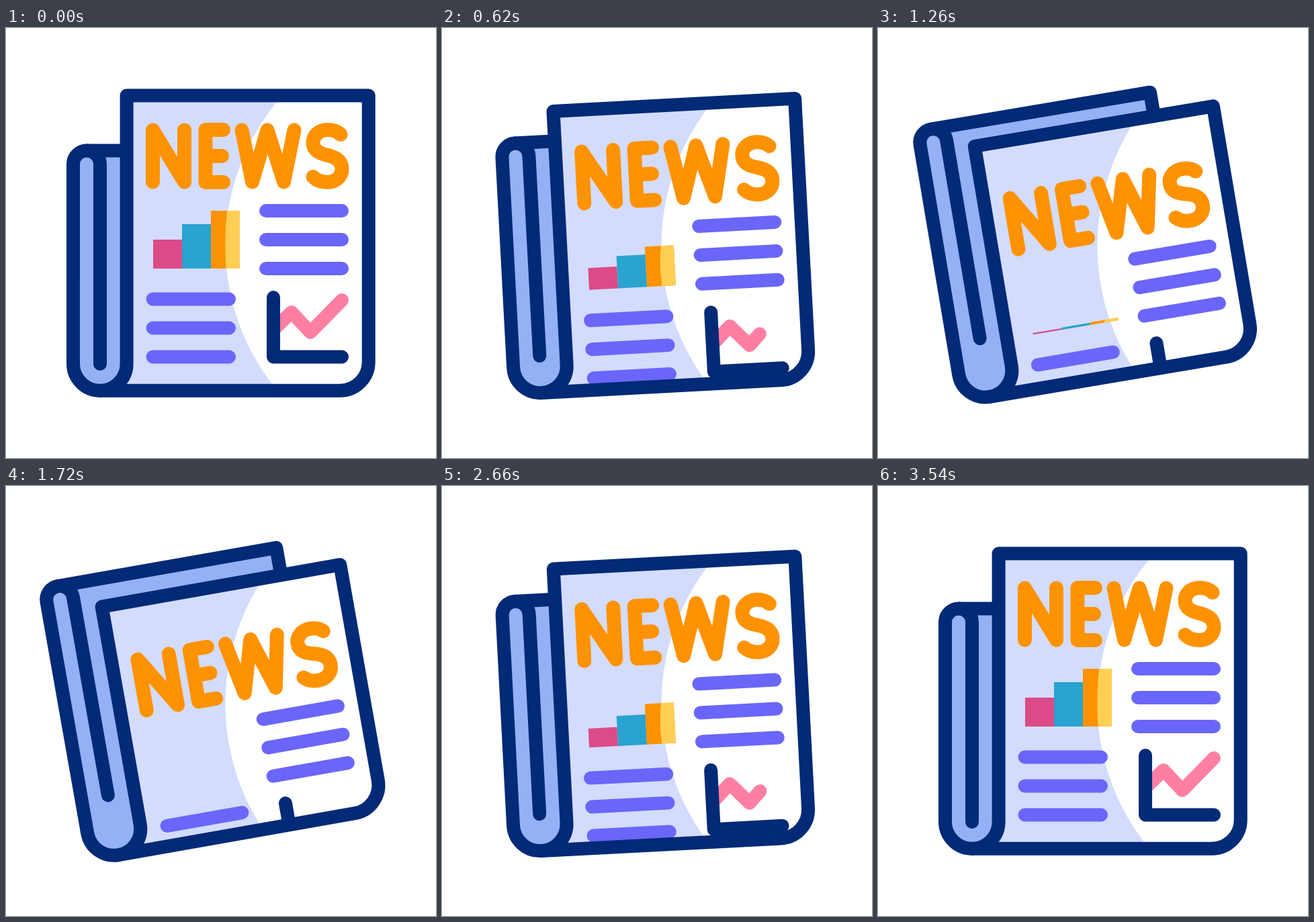
An HTML page with a canvas for the animation above (3600 ms loop, 640 by 640 pixels).

```html
<!DOCTYPE html>
<html lang="en">
<head>
<meta charset="utf-8">
<title>Newspaper</title>
<style>
  html, body { margin: 0; width: 100%; height: 100%; overflow: hidden; background: #fff; }
  canvas { display: block; width: 640px; height: 640px; }
</style>
</head>
<body>
<canvas id="stage" width="640" height="640"></canvas>
<script>
const ctx = document.getElementById('stage').getContext('2d');
const LOOP = 3600;
const PIVOT = [208, 387];
const NAVY = '#032a76', FOLD = '#94b1f5', PAPER = '#d3dcfc', PURPLE = '#6a66fa';
const ORANGE = '#ff9200', YELLOW = '#ffcf55', PINK = '#ff7fa3', MAGENTA = '#dc4b87', TEAL = '#29a3cf';

const LETTERS = [
  'M218.5 229V152L265.5 229V152',
  'M323.5 151.5H297V229.5H323.5M297 190.5H321.5',
  'M351 152L366.5 229L389 152L413.5 229L429 152',
  'M498 158.5C493 153.5 486 151.5 479 151.5C466 151.5 457 160 457 170C457 183 467 186.5 479 189.5' +
  'C491 192.5 500 198 500 210C500 222 490 229.5 478 229.5C469 229.5 462 226.5 457 221.5'
].map(d => new Path2D(d));
const AXES = new Path2D('M398 401V489.5H500');
const TREND = [[398, 449], [425, 423], [453, 453], [500, 405]];

// Ease with horizontal tangents: control points (x1, 0) and (x2, 1).
function ease(x, x1, x2) {
  if (x <= 0) return 0;
  if (x >= 1) return 1;
  let lo = 0, hi = 1, s = 0.5;
  for (let i = 0; i < 30; i++) {
    s = (lo + hi) / 2;
    const r = 1 - s;
    if (3 * r * r * s * x1 + 3 * r * s * s * x2 + s * s * s < x) lo = s; else hi = s;
  }
  return s * s * (3 - 2 * s);
}

function progress(t) {
  return t < 1840
    ? ease(t / 1760, 0.632, 0.096)
    : 1 - ease((t - 1920) / 1660, 0.6, 0.083);
}

function stroke(path, color, width = 20) {
  ctx.strokeStyle = color;
  ctx.lineWidth = width;
  ctx.stroke(path);
}

function fill(path, color) {
  ctx.fillStyle = color;
  ctx.fill(path);
}

function drawBack(p) {
  const top = 182.5 - 52.5 * p;
  const bend = top + 20;
  const outline = `M140 539.7A40 40 0 0 1 100 500V${bend}A20 20 0 0 1 120 ${top}H450.5V`;
  fill(new Path2D(outline + '500H179.6A39.7 39.7 0 0 1 140 539.7Z'), FOLD);
  stroke(new Path2D(outline + '300'), NAVY);
  stroke(new Path2D(`M120 ${top}A20 20 0 0 1 140 ${bend}V${500 - 50.5 * p}`), NAVY);
}

function drawTextRows(x1, x2, y) {
  for (let i = 0; i < 3; i++) {
    stroke(new Path2D(`M${x1} ${y + 43 * i}H${x2}`), PURPLE);
  }
}

function drawBar(x, height, color, rest) {
  const h = height * rest;
  if (h < 0.05) return;
  ctx.fillStyle = color;
  ctx.fillRect(x, 358 - h, 43, h);
}

function drawBars(t, p) {
  drawBar(219, 43, MAGENTA, 1 - progress(Math.max(0, t - 33)));
  drawBar(262, 66, TEAL, 1 - progress(Math.max(0, t - 17)));
  drawBar(305, 86, ORANGE, 1 - p);
  const top = 358 - 86 * (1 - p);
  if (p < 0.999) {
    fill(new Path2D(`M348 358V${top}H329Q324.5 ${(top + 358) / 2} 327.5 358Z`), YELLOW);
  }
}

function drawTrend(shown) {
  if (shown < 0.001) return;
  const lengths = TREND.slice(1).map((q, i) => Math.hypot(q[0] - TREND[i][0], q[1] - TREND[i][1]));
  let left = shown * lengths.reduce((a, b) => a + b);
  const path = new Path2D();
  path.moveTo(...TREND[0]);
  for (let i = 0; i < lengths.length && left > 0; i++) {
    const k = Math.min(1, left / lengths[i]);
    const [ax, ay] = TREND[i], [bx, by] = TREND[i + 1];
    path.lineTo(ax + (bx - ax) * k, ay + (by - ay) * k);
    left -= lengths[i];
  }
  stroke(path, PINK);
}

function tilt(p) {
  ctx.translate(...PIVOT);
  ctx.rotate(-10 * p * Math.PI / 180);
  ctx.translate(-PIVOT[0], -PIVOT[1]);
}

function drawPage(t, p) {
  const page = new Path2D(
    `M179.6 ${100.5 + 71 * p}H539.7V497A42.7 42.7 0 0 1 497 539.7H140A39.6 39.7 0 0 0 179.6 500Z`);
  ctx.save();
  ctx.clip(page);
  fill(page, PAPER);

  // The highlight stays still while the paper moves through it.
  ctx.save();
  ctx.setTransform(1, 0, 0, 1, 0, 0);
  ctx.fillStyle = '#fff';
  ctx.beginPath();
  ctx.arc(665.5, 324.4, 339, 0, 2 * Math.PI);
  ctx.fill();
  ctx.restore();

  ctx.translate(0, 106 * p);
  LETTERS.forEach(letter => stroke(letter, ORANGE, 21));
  drawTextRows(387, 500, 272);
  drawTextRows(218.5, 332, 403.5);
  drawBars(t, p);
  drawTrend(1 - p);
  stroke(AXES, NAVY);
  ctx.restore();

  stroke(page, NAVY);
}

function frame(now) {
  const t = now % LOOP;
  const p = progress(t);
  ctx.setTransform(1, 0, 0, 1, 0, 0);
  ctx.fillStyle = '#fff';
  ctx.fillRect(0, 0, 640, 640);
  ctx.lineCap = ctx.lineJoin = 'round';
  tilt(p);
  drawBack(p);
  drawPage(t, p);
}

const start = performance.now();
function tick() {
  frame(performance.now() - start);
  requestAnimationFrame(tick);
}
tick();
</script>
</body>
</html>
```
